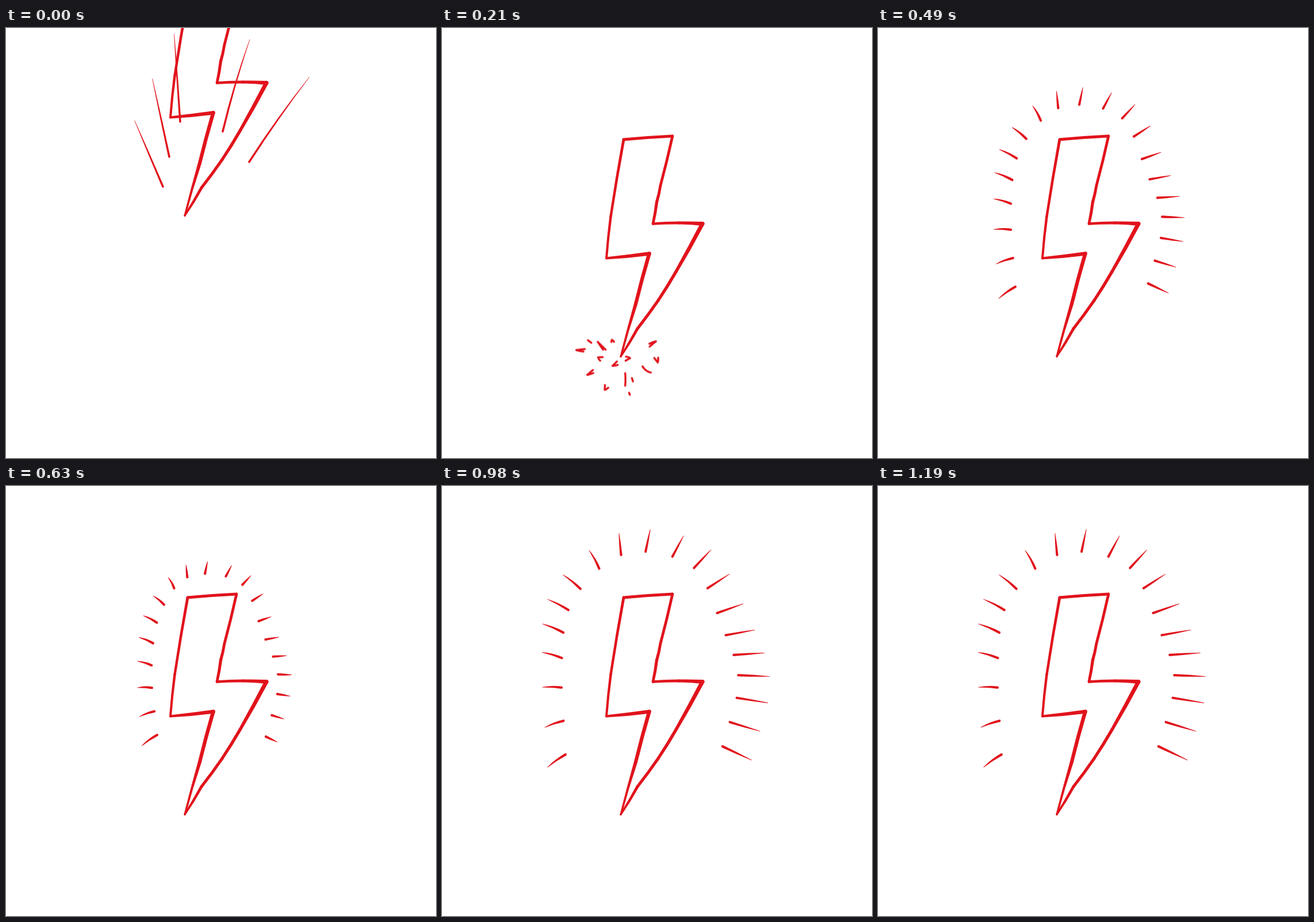
Animation, 748 px wide and 748 px high, one loop 1260 ms. Source, as an HTML page:

```html
<!DOCTYPE html>
<html lang="en">
<head>
<meta charset="utf-8">
<title>Lightning bolt</title>
<style>
  html, body { margin: 0; width: 100%; height: 100%; overflow: hidden; background: #fff; }
  svg { display: block; width: 100%; height: 100%; }
  .ink { fill: #e1131c; }
  .chips path { fill: none; stroke: #e1131c; stroke-width: 3.4; stroke-linecap: round; stroke-linejoin: round; vector-effect: non-scaling-stroke; }

  /* Three acts on a 1260 ms loop, each cycling through three 70 ms drawings */
  #bolt { animation: drop 1260ms step-end infinite; }
  #fall { animation: fall 1260ms step-end infinite; }
  #burst { animation: burst 1260ms step-end infinite; }
  #glow { animation: glow 1260ms step-end infinite; }
  .p0, .p1, .p2 { animation: pose 210ms step-end infinite; }
  .p1 { animation-delay: -140ms; }
  .p2 { animation-delay: -70ms; }

  @keyframes drop {
    0% { transform: translate(0, -245px); }
    5.55% { transform: translate(6px, -158px); }
    11.11% { transform: translate(12px, -71px); }
    16.66%, 100% { transform: none; }
  }
  @keyframes fall { 0% { opacity: 1; } 16.66%, 100% { opacity: 0; } }
  @keyframes burst { 0% { opacity: 0; } 16.66% { opacity: 1; } 33.33%, 100% { opacity: 0; } }
  @keyframes glow { 0% { opacity: 0; } 33.33%, 100% { opacity: 1; } }
  @keyframes pose { 0% { opacity: 1; } 33.33%, 100% { opacity: 0; } }
</style>
</head>
<body>
<svg viewBox="0 0 748 748">
  <g id="bolt" class="ink"></g>
  <g id="fall" class="ink"></g>
  <g id="burst"></g>
  <g id="glow" class="ink"></g>
</svg>
<script>
const byId = id => document.getElementById(id);
const RAD = Math.PI / 180;
const mix = (a, b, t) => a.map((v, i) => v + (b[i] - v) * t);
const shape = (d, cls = '') => `<path class="${cls}" d="${d}"/>`;

// Brush stroke between two points, bowed sideways, with its own width at each end
function brush([x0, y0], [x1, y1], bow, w0, w1) {
  const len = Math.hypot(x1 - x0, y1 - y0);
  const nx = (y0 - y1) / len, ny = (x1 - x0) / len;
  const cx = (x0 + x1) / 2 + nx * bow * 2, cy = (y0 + y1) / 2 + ny * bow * 2;
  const a = w0 / 2, b = w1 / 2, m = a * 0.85 + b * 0.15;
  const at = (x, y, r) => (x + nx * r).toFixed(2) + ' ' + (y + ny * r).toFixed(2);
  return `M${at(x0, y0, a)}Q${at(cx, cy, m)} ${at(x1, y1, b)}A${b} ${b} 0 0 0 ${at(x1, y1, -b)}` +
    `Q${at(cx, cy, -m)} ${at(x0, y0, -a)}A${a} ${a} 0 0 0 ${at(x0, y0, a)}Z`;
}

// Point at u (0 to 1) on a smooth curve through evenly timed knots
function spline(knots, u) {
  const last = knots.length - 1;
  const i = Math.min(Math.floor(u * last), last - 1), t = u * last - i;
  const p = knots[i], q = knots[i + 1];
  const before = knots[i - 1] || mix(q, p, 2), after = knots[i + 2] || mix(p, q, 2);
  return p.map((v, k) => {
    const s0 = (q[k] - before[k]) / 2, s1 = (after[k] - v) / 2, d = q[k] - v;
    return v + t * (s0 + t * (3 * d - 2 * s0 - s1 + t * (s0 + s1 - 2 * d)));
  });
}

// Bolt outline, clockwise: x, y, pen width
const bolt = [
  [316, 194, 4.8], [401, 188, 4.8], [380, 274, 4.8], [373.5, 303, 5.2], [367, 340.5, 4.6],
  [413, 339, 5], [453, 340.5, 7], [407, 424, 5.4], [376, 474, 5.2], [340, 523, 5],
  [311, 571.5, 3.2], [337, 480, 6.2], [360.5, 392.5, 6.6], [286, 400.5, 4], [293.5, 328, 4.4]
];
byId('bolt').innerHTML = bolt.map((p, i) => {
  const q = bolt[(i + 1) % bolt.length];
  return shape(brush(p, q, -0.5, p[2], q[2]));
}).join('');

// Speed lines: first they fan out from one point, then they lean outwards on each side
const focus = [318, 381];
const fan = [[273, 276], [284, 224], [303, 163], [377, 180], [423, 233]].map((foot, i) => {
  const reach = Math.hypot(foot[0] - focus[0], foot[1] - focus[1]);
  return [foot, mix(focus, foot, 1 + (125 + 14 * i) / reach)];
});
const lean = [
  [248, 382, 179], [283, 226, 102], [343, 108, 95], [448, 183, 127], [440, 387, 134],
  [212, 313, 67], [326, 62, 55], [476, 148, 48], [499, 318, 51]
].map(([x, y, len]) => {
  const turn = ((x < 350 ? -10 : 21) + (x - 343) * 0.06) * RAD;
  return [[x, y], [x + len * Math.sin(turn), y - len * Math.cos(turn)]];
});
const between = fan.map((line, i) => line.map((p, k) => mix(p, lean[i][k], 0.5)));
byId('fall').innerHTML = [fan, between, lean].map((lines, i) =>
  shape(lines.map(([foot, tip]) => brush(foot, tip, foot[0] < 350 ? i : -2, 3.6, 0.7)).join(''), 'p' + i)
).join('');

// Chips: hooks given by corner, direction and size; the smaller, the wider they open
function hook([x, y, turn, size]) {
  const arm = (deg, len) => `${x + len * Math.cos(deg * RAD)} ${y + len * Math.sin(deg * RAD)}`;
  const open = Math.min(60, 20000 / size ** 2);
  return `M${arm(turn, size)}L${x} ${y}Q${arm(turn + open * 1.3, size * 0.4)} ${arm(turn + open, size * 0.85)}`;
}
const chips = [
  [139, 546, -7, 33], [222, 514, 45, 43], [277, 506, 45, 11], [223, 574, -3, 18],
  [279, 607, -45, 24], [347, 577, 150, 20], [447, 512, 140, 32], [454, 594, 232, 22],
  [181, 642, -41, 29], [249, 700, -88, 19]
].map(hook).join('') +
  'M184 508L197 518M395 609Q406 628 427 633M328 635Q330 660 328 684M354 654L358 667M343 711L346 719';
byId('burst').innerHTML = [0.45, 0.75, 1].map((s, i) =>
  `<g class="chips p${i}"><g transform="translate(311 572) scale(${s}) translate(-311 -572)">${shape(chips)}</g></g>`
).join('');

// Rays: each travels along its own line from the inner arch through the outer one
const RAYS = 20;
const inner = [[263, 433], [253, 323], [267, 224], [319, 157], [408, 169], [446, 254], [474, 337], [452, 436]];
const outer = [[215, 467], [208, 313], [227, 200], [317, 118], [434, 139], [487, 244], [516, 340], [488, 453]];
function rays(start) {
  let d = '';
  for (let i = 0; i < RAYS; i++) {
    const u = i / (RAYS - 1);
    const a = spline(inner, u), b = spline(outer, u);
    const len = 0.55 + start * (0.1 + 0.75 * u);
    d += brush(mix(a, b, start), mix(a, b, start + len), u < 0.4 ? 1 : 0, 4.2, 0.8);
  }
  return d;
}
byId('glow').innerHTML = [0, 0.5, 1].map((start, i) => shape(rays(start), 'p' + i)).join('');
</script>
</body>
</html>
```
